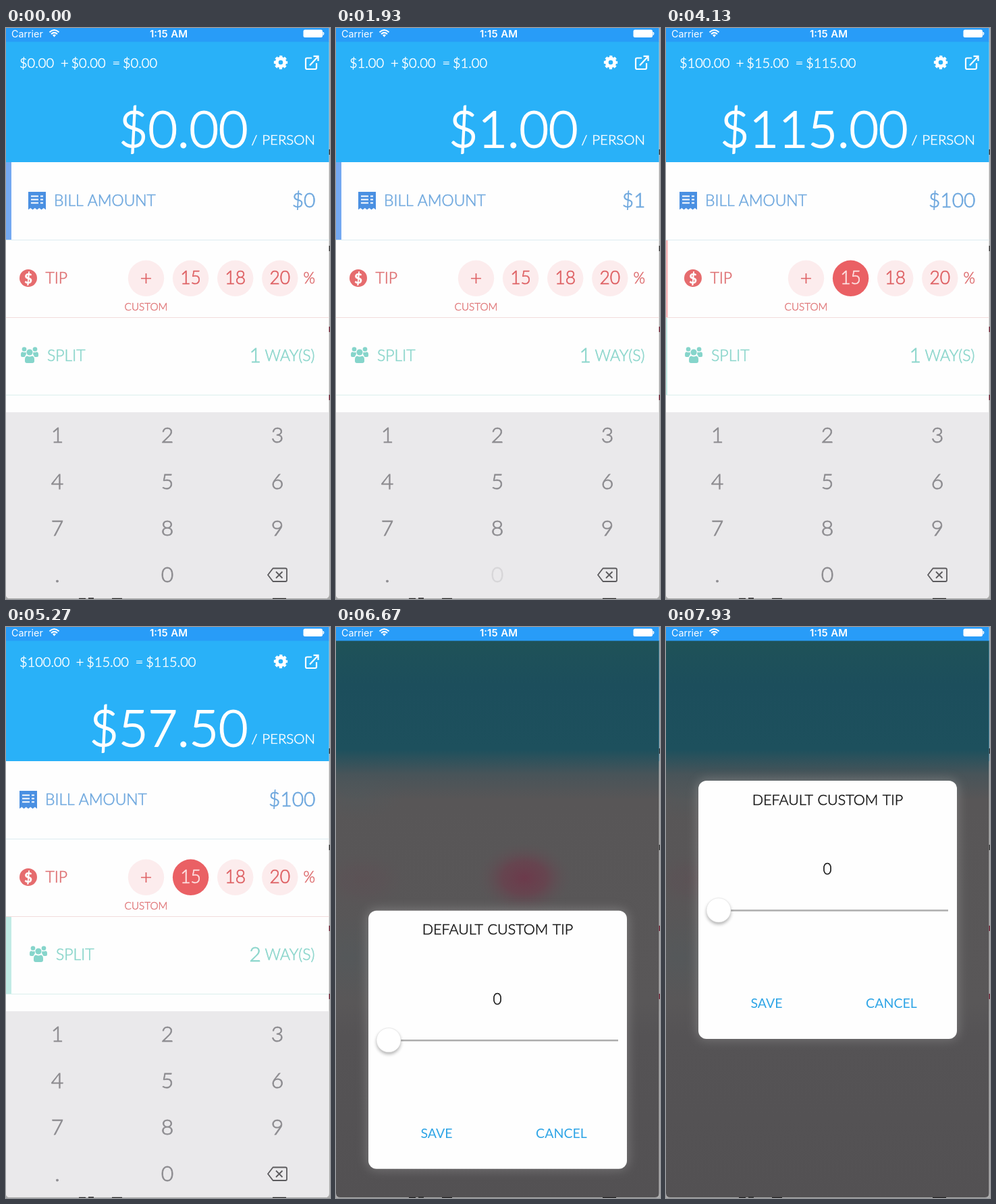
Write an HTML page that moves like this. It is 480x847 px and loops after 8 s.

```html
<!DOCTYPE html>
<html lang="en">
<head>
<meta charset="utf-8">
<title>Tip calculator</title>
<style>
html, body { margin: 0; width: 100%; height: 100%; overflow: hidden; background: #aaa; }
svg { display: block; width: 480px; height: 847px; }
text { font-family: Lato, "Open Sans", sans-serif; font-weight: 300; fill: currentColor; stroke: currentColor; stroke-width: .026em; word-spacing: .06em; white-space: pre; }
.status text { font-family: Inter, Roboto, sans-serif; font-weight: 400; stroke: none; }
.status .clock { font-weight: 600; }
.buttons text { font-weight: 400; stroke: none; }
</style>
</head>
<body>
<svg viewBox="0 0 480 847">
  <defs>
    <linearGradient id="dim" x2="0" y2="1">
      <stop offset="0" stop-color="#1f5258"/>
      <stop offset=".08" stop-color="#1c4e5c"/>
      <stop offset=".195" stop-color="#1d505d"/>
      <stop offset=".24" stop-color="#485459"/>
      <stop offset=".285" stop-color="#585657"/>
      <stop offset=".65" stop-color="#595758"/>
      <stop offset=".71" stop-color="#555355"/>
      <stop offset="1" stop-color="#535153"/>
    </linearGradient>
    <radialGradient id="red">
      <stop offset="0" stop-color="#6c3a4b"/>
      <stop offset=".45" stop-color="#68424e" stop-opacity=".85"/>
      <stop offset="1" stop-color="#5b5557" stop-opacity="0"/>
    </radialGradient>
    <radialGradient id="teal">
      <stop offset="0" stop-color="#4c5b5f" stop-opacity=".8"/>
      <stop offset="1" stop-color="#4c5b5f" stop-opacity="0"/>
    </radialGradient>
    <filter id="glow" x="-20%" y="-20%" width="140%" height="140%"><feGaussianBlur stdDeviation="8"/></filter>
    <filter id="soft" x="-50%" y="-50%" width="200%" height="200%"><feGaussianBlur stdDeviation="2.5"/></filter>
    <clipPath id="screen"><path d="M0 0H478.6V840q0 6-6 6H6q-6 0-6-6z"/></clipPath>
  </defs>

  <g clip-path="url(#screen)">
    <rect width="480" height="847" fill="#fefefe"/>
    <rect y="20" width="480" height="179" fill="#29b1f8"/>
    <rect y="570" width="480" height="277" fill="#eae9eb"/>
    <path d="M0 314.5H480" stroke="#dcebf1"/>
    <path d="M0 429.5H480" stroke="#f2dcdc"/>
    <path d="M0 544.5H480" stroke="#daf0ee"/>

    <g id="gear" transform="translate(407 51)" fill="none" stroke="#fff">
      <circle r="5.8" stroke-width="5"/>
      <circle r="8.5" stroke-width="3.4" stroke-dasharray="4 2.676" stroke-dashoffset="2"/>
    </g>
    <path d="M453 44.5H446Q444 44.500 444 46.500V59Q444 61 446 61H458Q460 61 460 59V52M450 55.500L462 42.500M455.500 41.800H462.500V49" fill="none" stroke="#fff" stroke-width="2.2"/>

    <rect id="bar0" y="199" height="115" fill="#74a9f1"/>
    <rect id="bar1" y="315" height="114" fill="#f6b7b9"/>
    <rect id="bar2" y="430" height="114" fill="#c1ebe5"/>

    <g id="row0">
      <path d="M20 243H46V269.500l-3.200-2.500-3.300 2.500-3.200-2.500-3.300 2.500-3.200-2.500-3.300 2.500-3.200-2.500L20 269.500z" fill="#4a90e2"/>
      <path d="M24 249.500H35M24 254.500H35M24 259.500H35M38 249.500H42M38 254.500H42M38 259.500H42" stroke="#fff" stroke-width="2.200"/>
    </g>
    <g id="row1"><circle cx="33" cy="371" r="13" fill="#e66c6e"/></g>
    <g id="row2" fill="#86d5cb">
      <circle cx="35" cy="481" r="4.600"/>
      <path d="M28 494v-2.500q0-4.500 3.500-5q3.500 2 7 0q3.500.500 3.500 5V494q0 3-3 3H31q-3 0-3-3z"/>
      <circle cx="27" cy="476.500" r="3.300"/><circle cx="43" cy="476.500" r="3.300"/>
      <path d="M22 486v-2q0-3.500 2.500-3.500q2.500 1.200 4.800.300l.700 3-2.500 4.200H24q-2 0-2-2zM48 486v-2q0-3.500-2.500-3.500q-2.500 1.200-4.800.300l-.700 3 2.500 4.200H46q2 0 2-2z"/>
    </g>
    <g id="content"></g>
    <path d="M395.500 801.500H414Q416 801.500 416 803.500V819Q416 821 414 821H395.500L388 811.300zM400 806.500L409.500 816M409.500 806.500L400 816" fill="none" stroke="#5b5a5d" stroke-width="1.800" stroke-linejoin="round"/>

    <g id="overlay">
      <rect y="20" width="480" height="827" fill="url(#dim)"/>
      <ellipse cx="30" cy="250" rx="70" ry="35" fill="url(#teal)" opacity=".4"/>
      <ellipse cx="20" cy="490" rx="85" ry="65" fill="url(#teal)" opacity=".4"/>
      <ellipse cx="40" cy="375" rx="70" ry="45" fill="url(#red)" opacity=".15"/>
      <ellipse cx="279" cy="372" rx="72" ry="54" fill="url(#red)"/>
    </g>
    <g id="modal">
      <rect x="46" y="-2" width="387" height="386" rx="14" fill="#aaa" opacity=".42" filter="url(#glow)"/>
      <rect x="48" width="383" height="383" rx="12" fill="#fefefe"/>
      <path d="M80 192.500H418" stroke="#adadad" stroke-width="2.400"/>
      <circle cx="78" cy="195" r="18" fill="#000" opacity=".3" filter="url(#soft)"/>
      <circle cx="78" cy="192" r="18" fill="#fff" stroke="#ddd" stroke-width=".6"/>
    </g>

    <g class="status" color="#fff">
      <rect width="480" height="20.500" fill="#289cf8"/>
      <text x="8" y="13.500" font-size="14.300">Carrier</text>
      <text class="clock" x="241" y="13.500" font-size="15" text-anchor="middle">1:15 AM</text>
      <path d="M64.500 6.200Q71.500 -.300 78.500 6.200M67 9Q71.500 4.800 76 9" fill="none" stroke="#fff" stroke-width="2"/>
      <path d="M69 10.500Q71.500 8.500 74 10.500L71.500 13.500z" fill="#fff"/>
      <rect x="440.500" y="2.500" width="28.500" height="11.500" rx="2.500" fill="#fff"/>
      <path d="M470 6q2 2 0 4.500z" fill="#fff" stroke="#fff"/>
    </g>
  </g>
  <path d="M108 846.500H118M122 846H130M157 846.500H172M395 846.500H415" stroke="#222" stroke-width="1.600"/>
  <path d="M479.300 180V188M479.300 323V331" stroke="#333" stroke-width="1.400"/>
  <path d="M479.300 443V451M479.300 544V552" stroke="#6b1c30" stroke-width="1.400"/>
</svg>

<script>
const LOOP = 8000;
const $ = id => document.getElementById(id);
const content = $('content');
const BLUE = '#6fa8de', RED = '#de7072', MINT = '#8cd6cc', INK = '#151515';

function make(name, attrs, parent = content) {
  const el = document.createElementNS('http://www.w3.org/2000/svg', name);
  for (const key in attrs) el.setAttribute(key, attrs[key]);
  return parent.appendChild(el);
}
function label(str, x, y, size, color, anchor = 'start', parent = content) {
  const el = make('text', { x, y, 'font-size': size, color, 'text-anchor': anchor }, parent);
  el.textContent = str;
  return el;
}

// Header
const sums = ['', '+', '='].map(sign => {
  const mark = label(sign, 0, 58.5, 20, '#fff');
  const value = label('', 0, 58.5, 20, '#fff');
  return { mark, value };
});
const total = label('', 358.5, 176.5, 75, '#fff', 'end');
label('/ PERSON', 458, 173, 20.5, '#fff', 'end');

// Rows
label('BILL AMOUNT', 58, 264, 22.9, BLUE, 'start', $('row0'));
label('TIP', 58.5, 378.5, 23, RED, 'start', $('row1'));
label('$', 33, 378.5, 20, '#fff', 'middle', $('row1')).style.fontWeight = 700;
label('SPLIT', 61, 493.5, 23, MINT, 'start', $('row2'));
const bill = label('', 458.5, 266, 30, BLUE, 'end');
const chips = ['', '15', '18', '20'].map((str, i) => {
  const x = 207.5 + i * 66.1;
  const disc = make('circle', { cx: x, cy: 371.3, r: 26.7, fill: '#fceced' });
  return { disc, text: label(str, x, 379.5, 26.5, '#de6265', 'middle') };
});
make('path', { d: 'M200 371.500H215M207.500 364V379', stroke: '#de6265', 'stroke-width': 1.7 });
label('%', 458, 379, 22.5, RED, 'end');
label('CUSTOM', 207.5, 418.5, 15.3, RED, 'middle');
const ways = label('', 378, 495.5, 30, MINT, 'end');
label('WAY(S)', 457.5, 493.5, 23, MINT, 'end');

// Keypad
const keys = {};
[...'123456789.0'].forEach((k, i) => {
  keys[k] = label(k, 76 + i % 3 * 163, 614.5 + Math.floor(i / 3) * 69, 32, '#8d8c90', 'middle');
});

// Dialog
const modal = $('modal');
label('DEFAULT CUSTOM TIP', 239.5, 35.5, 21.5, INK, 'middle', modal);
label('0', 239, 139, 22.5, INK, 'middle', modal);
const buttons = make('g', { class: 'buttons' }, modal);
label('SAVE', 149, 337, 19.6, '#2fa5e6', 'middle', buttons);
label('CANCEL', 334, 337, 19.6, '#2fa5e6', 'middle', buttons);

const PRESSES = [['1', 1400, 1520], ['0', 1870, 1990], ['0', 2190, 2310], ['2', 4600, 4720]];
const TIP_AT = 3060, SPLIT_AT = 4020, SLIDE = 230;

const clamp = v => Math.min(1, Math.max(0, v));
const progress = (t, start, length) => clamp((t - start) / length);
const easeInOut = p => p < .5 ? 2 * p * p : 1 - 2 * (1 - p) ** 2;
const money = v => '$' + v.toFixed(2);

function setText(el, str) {
  if (el.textContent !== str) el.textContent = str;
}

function keyOpacity(key, t) {
  return PRESSES.reduce((alpha, [k, down, up]) =>
    k === key && t >= down ? Math.min(alpha, .2 + .8 * progress(t, up, 250)) : alpha, 1);
}

function drawAmounts(t) {
  const typed = PRESSES.filter(([, , up]) => t >= up).length;
  const amount = [0, 1, 10, 100, 100][typed];
  const people = typed > 3 ? 2 : 1;
  const picked = t >= TIP_AT;
  const tip = picked ? amount * .15 : 0;
  let x = 20;
  [amount, tip, amount + tip].forEach((v, i) => {
    const { mark, value } = sums[i], str = money(v);
    mark.setAttribute('x', x);
    value.setAttribute('x', x + (i ? 15.5 : 0));
    setText(value, str);
    x += (i ? 76.5 : 61) + (str.length - 5) * 11.4;
  });
  setText(total, money((amount + tip) / people));
  setText(bill, '$' + amount);
  setText(ways, String(people));
  chips[1].disc.setAttribute('fill', picked ? '#ea6064' : '#fceced');
  chips[1].text.setAttribute('color', picked ? '#fde1e2' : '#de6265');
}

function drawRows(t) {
  const toTip = easeInOut(progress(t, TIP_AT, SLIDE));
  const toSplit = easeInOut(progress(t, SPLIT_AT, SLIDE));
  [1 - toTip, toTip - toSplit, toSplit].forEach((active, i) => {
    $('row' + i).setAttribute('transform', `translate(${13 * active} 0)`);
    $('bar' + i).setAttribute('width', 8 * clamp((active - .3) / .7));
  });
}

function draw(t) {
  drawAmounts(t);
  drawRows(t);
  for (const k in keys) keys[k].setAttribute('opacity', keyOpacity(k, t));
  $('gear').setAttribute('opacity', t > 5880 && t < 6000 ? .3 : 1);
  $('overlay').setAttribute('opacity', progress(t, 6000, 270));
  const rest = (1 - progress(t, 6420, 568)) ** 2;
  modal.setAttribute('transform', `translate(0 ${228 + 619 * rest})`);
  modal.setAttribute('visibility', t < 6420 ? 'hidden' : 'visible');
}

function tick() {
  draw(performance.now() % LOOP);
  requestAnimationFrame(tick);
}
tick();
</script>
</body>
</html>
```
